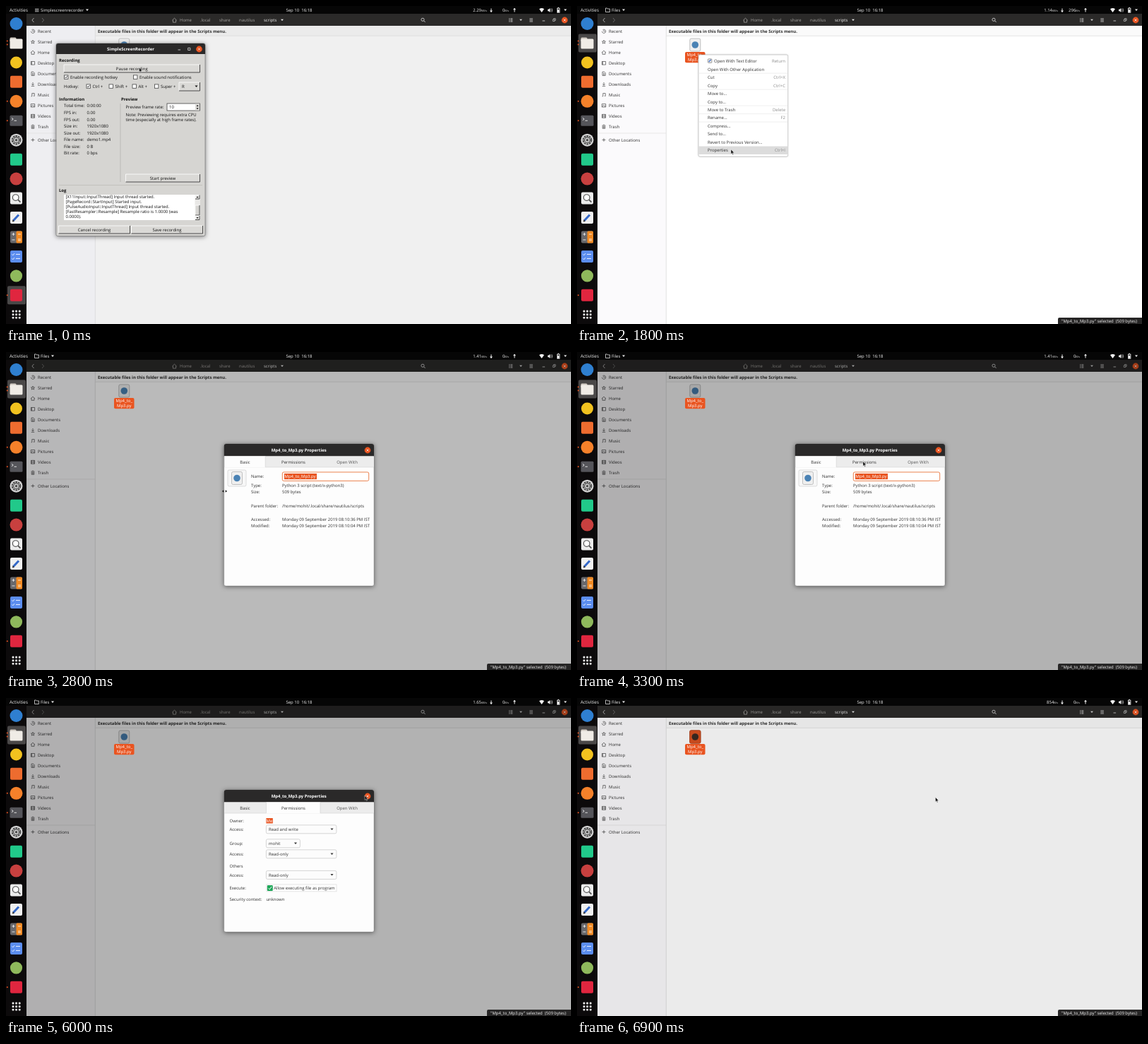
These frames come from a looping animation (800 px wide and 450 px high, 7000 ms). An HTML page:

```html
<!DOCTYPE html>
<html lang="en">
<head>
<meta charset="utf-8">
<title>Script permissions</title>
<style>
html, body { margin: 0; width: 100%; height: 100%; overflow: hidden; background: #000; }
svg { display: block; width: 800px; height: 450px; }
text { font: 500 5.98px "Open Sans", "Noto Sans", sans-serif; text-rendering: geometricPrecision; }
.b { font-weight: 700; }
.shadow { filter: drop-shadow(0 1px 3px rgba(0,0,0,.5)); }
.soft { filter: drop-shadow(0 .5px 1px rgba(0,0,0,.18)); }
</style>
</head>
<body>
<svg id="stage" viewBox="0 0 800 450"></svg>
<script>
const LOOP = 7000, STEP = 100;
const ORANGE = '#e95420', INK = '#303030', DARK = '#2a2929';

// Markup helpers
const rect = (x, y, w, h, fill, more = '') =>
  `<rect x="${x}" y="${y}" width="${w}" height="${h}" fill="${fill}" ${more}/>`;
const disc = (x, y, r, fill, more = '') => `<circle cx="${x}" cy="${y}" r="${r}" fill="${fill}" ${more}/>`;
const line = (d, color = '#444', w = .7) => `<path d="${d}" fill="none" stroke="${color}" stroke-width="${w}"/>`;
const fill = (d, color) => `<path d="${d}" fill="${color}"/>`;
const text = (x, y, s, color = INK, more = '') => `<text x="${x}" y="${y}" fill="${color}" ${more}>${s}</text>`;
const mid = (x, y, s, color, more = '') => text(x, y, s, color, 'text-anchor="middle" ' + more);
const bold = (x, y, s, color) => text(x, y, s, color, 'class="b"');
const tri = (x, y, color) => fill(`M${x - 2} ${y - 1}h4l-2 2.4z`, color);
const group = (id, body, more = '') => `<g id="${id}" ${more}>${body}</g>`;
const closeButton = (x, y) =>
  disc(x, y, 4.4, ORANGE) + line(`M${x - 1.5} ${y - 1.5}l3 3m0 -3l-3 3`, '#fff', .7);

function topBar() {
  const arrow = (x, up) => line(up ? `M${x} 8.5v-5` : `M${x} 3.5v5`, '#eee', 1) +
    fill(up ? `M${x - 2} 5.2h4l-2 -2.4z` : `M${x - 2} 6.6h4l-2 2.4z`, '#eee');
  const w = '#f2f2f2';
  return rect(0, 0, 800, 11, '#060606') +
    text(5, 8, 'Activities', w, 'style="font-size:6.3px"') +
    group('appA', line('M41 4.2h5.5M41 6h5.5M41 7.8h5.5', '#ddd', .8) + text(49, 8, 'Simplescreenrecorder', w) + tri(115, 5.6, w)) +
    group('appB', line('M40.5 8.5v-5.5h2l.8 1h3.2v4.5z', '#ddd', .8) + text(49, 8, 'Files', w) + tri(66, 5.6, w)) +
    mid(415, 8, 'Sep 10\u00a0 16:18', w) +
    group('down', '') + arrow(687) + group('up', '') + arrow(720, true) +
    fill('M755 4.3q3.5 -2.6 7 0l-3.5 4.7z', w) +
    fill('M767 4.8h1.4l2 -1.8v6l-2 -1.8h-1.4z', w) + line('M771.5 4.3q1.4 1.7 0 3.4M772.7 3.2q2.3 2.8 0 5.6', w, .6) +
    rect(780.5, 3.2, 3.4, 6, 'none', `stroke="${w}" stroke-width=".8"`) + rect(781, 5, 2.4, 4, w) + rect(781.4, 2, 1.6, 1, w) +
    tri(792, 5.6, w);
}

function dock() {
  const x = 14.5, y = i => 25 + 27.45 * i;
  const tile = (i, c) => rect(6, y(i) - 8.5, 17, 17, c, 'rx="2"');
  const dot = v => disc(1.8, v, 1, ORANGE);
  let s = rect(0, 11, 29, 439, '#0c0a0b') +
    rect(2, y(1) - 13, 26, 26, '#4a4848', 'rx="2" id="litFiles"') +
    rect(2, y(14) - 13, 26, 26, '#4a4848', 'rx="2" id="litRec"') +
    disc(x, y(0), 9, '#2f7fd0') +
    rect(5.5, y(1) - 8, 9, 6, '#cfc8c0', 'rx="1.5"') + rect(5.5, y(1) - 6, 18, 14, '#f0ece6', 'rx="1.5"') +
    disc(x, y(2), 8.5, '#f2c21f') + tile(3, '#ee6c2f') + disc(x, y(4), 9, '#f5812a') +
    rect(5.5, y(5) - 7.5, 18, 15, '#55555a', 'rx="1.5"') + line(`M8 ${y(5) - 4}l2.2 1.8l-2.2 1.8M11.5 ${y(5)}h3.5`, '#eee', .9) +
    disc(x, y(6), 9, '#d4d4d4') + disc(x, y(6), 5.8, 'none', 'stroke="#4a4a4a" stroke-width="2" stroke-dasharray="2.7 .94"') +
    disc(x, y(6), 3.8, 'none', 'stroke="#4a4a4a" stroke-width="1.2"') + disc(x, y(6), 1.8, '#4a4a4a') +
    tile(7, '#21c98a') + disc(x, y(8), 9, '#c8403f') +
    tile(9, '#ececec') + disc(13.7, y(9) - 1, 4.3, '#fff', 'stroke="#555" stroke-width="1.2"') + line(`M17 ${y(9) + 2}l3.4 3.6`, '#555', 1.8) +
    tile(10, '#f0f0f0') + line(`M10.5 ${y(10) + 4}l7.5 -8`, '#3468c8', 3) + fill(`M9 ${y(10) + 6}l.6 -3.2l2.4 2.2z`, '#222') +
    tile(11, '#68686c') + rect(14.5, y(11) - 8.5, 8.5, 17, '#f08a24', 'rx="1.5"') +
    line(`M8.5 ${y(11) - 4}h4M10.5 ${y(11) - 6}v4M8.5 ${y(11) + 4}h4M17 ${y(11) + 3}h4M17 ${y(11) + 5}h4M17 ${y(11) - 4}h4`, '#fff', .8) +
    tile(12, '#5b8def') + line(`M8.5 ${y(12) - 3}l1.3 1.3l2.2 -2.6M8.5 ${y(12) + 3}l1.3 1.3l2.2 -2.6M14 ${y(12) - 3}h6M14 ${y(12) + 3}h6`, '#fff', .9) +
    disc(x, y(13), 8.6, '#8fb95c') + tile(14, '#e0263f') +
    [49.5, 54.5, y(4), y(5), y(14)].map(dot).join('');
  for (let i = 0; i < 9; i++)
    s += rect(8.6 + i % 3 * 4.6, 430.6 + Math.floor(i / 3) * 4.6, 2.8, 2.8, '#eee', 'rx=".8"');
  return s;
}

const fileIcon = (x, y) => rect(x - 7.5, y - 9, 15, 18, '#efefef', 'rx="2" stroke="#a9a9a9" stroke-width=".7"') + disc(x, y, 4.8, '#4a82b4');

function header() {
  const g = '#a5a3a0', w = '#f4f4f4';
  return rect(29, 11, 771, 17, '#2b2a29') +
    line('M39.5 17l-2.6 3l2.6 3', '#c9c9c9', .8) + line('M51 17l2.6 3l-2.6 3', '#777', .8) +
    line('M235.4 20.2l3.1 -3l3.1 3M236.4 19.6v3.5h4.2v-3.5', g, .8) +
    [[246, 'Home'], [275, '.local'], [302, 'share'], [330, 'nautilus']].map(p => text(p[0], 22, p[1], g)).join('') +
    text(365, 22, 'scripts', w) + tri(391, 19.7, w) +
    disc(590, 19.3, 2.1, 'none', 'stroke="#ddd" stroke-width=".8"') + line('M591.6 20.9l2 2', '#ddd', .9) +
    line('M712 18h1.4M712 20h1.4M712 22h1.4M714.3 18h3M714.3 20h3M714.3 22h3', '#ddd', .9) + tri(729, 19.7, '#ddd') +
    line('M741.3 18h4.6M741.3 20h4.6M741.3 22h4.6', '#ddd', .8) +
    line('M759.5 21h3.6', '#ddd', .8) + line('M774.3 18.9h2.6v2.6h-2.6zM775.5 18.9v-1.2h2.6v2.6h-1.2', '#ddd', .6) + closeButton(791, 20);
}

function filesWindow() {
  const places = [
    ['Recent', 'M35.5 0a2.6 2.6 0 1 0 1 -2M38 -1.5v1.7h1.5'],
    ['Starred', 'M38 -2.4l.7 1.7h1.8l-1.4 1.2l.6 1.8l-1.7 -1.1l-1.7 1.1l.6 -1.8l-1.4 -1.2h1.8z'],
    ['Home', 'M35 .2l3 -2.8l3 2.8M36 -.4v2.9h4v-2.9'],
    ['Desktop', 'M35.4 -2.3h5.2v4.6h-5.2zM36.4 -2.3v4.6'],
    ['Documents', 'M36 -2.6h2.8l1.4 1.4v3.8h-4.2zM37 0h2.2M37 1.3h2.2'],
    ['Downloads', 'M38 -2.8v4M36.3 -.4l1.7 1.7l1.7 -1.7M35.8 2.6h4.4'],
    ['Music', 'M36.8 2v-4.2h3.4v3.8M35.6 2h1.2M39 1.6h1.2'],
    ['Pictures', 'M35.3 -2.2h5.4v4.4h-5.4zM35.8 1.6l1.6 -2l1.2 1.2l.8 -.6l1 1.4'],
    ['Videos', 'M35.4 -2.4h5.2v4.8h-5.2zM36.6 -2.4v4.8M39.4 -2.4v4.8M36.6 0h2.8'],
    ['Trash', 'M35.6 -1.8h4.8M37.2 -2.6h1.6M36.2 -1.2v3.7h3.6v-3.7M37.4 -.6v2.4M38.6 -.6v2.4'],
  ];
  const list = places.map(([name, d], i) =>
    `<g transform="translate(0 ${35.8 + 15 * i})">${line(d)}${text(45, 2.2, name)}</g>`).join('');
  return rect(29, 28, 97, 422, '#fafafa', 'id="side"') + rect(126, 28, 674, 422, '#fff', 'id="main"') +
    header() + line('M126.3 28v422', '#d6d6d6') + line('M29 180h97', '#dedede') + list +
    line('M35.6 189.5h4.8M38 187.1v4.8') + text(45, 191.7, 'Other Locations') +
    rect(126.6, 28, 674, 14, '#000', 'opacity=".02"') + line('M126.6 42.3h674', '#d2d2d2', .6) +
    bold(130, 37.6, 'Executable files in this folder will appear in the Scripts menu.', '#2e2e2e') +
    fileIcon(167.3, 55) +
    group('tint', rect(159.5, 45.7, 15.6, 18.6, '#d9501f', 'rx="2" stroke="#a83a12" stroke-width=".7"') + disc(167.3, 55, 4.8, '#3a2a22')) +
    rect(29, 11, 771, 439, '#000', 'id="dim"') +
    rect(153, 65, 28.5, 15.3, ORANGE, 'rx="2" id="pick"') +
    group('label', mid(167.3, 71.4, 'Mp4_to_') + mid(167.3, 78.4, 'Mp3.py')) +
    group('status', fill('M681 450v-7q0 -2 2 -2h117v9z', '#262525') +
      text(686, 447.9, '"Mp4_to_Mp3.py" selected\u00a0 (509 bytes)', '#f4f4f4'));
}

function recorder() {
  const k = '#111';
  const edge = (x, y, w, h) => line(`M${x} ${y + h}v${-h}h${w}`, '#fff', .8) + line(`M${x} ${y + h}h${w}v${-h}`, '#3c3c3a', .9);
  const button = (x, y, w, s) => rect(x, y, w, 11, '#dad9d6') + edge(x, y, w, 11) + mid(x + w / 2, y + 7.6, s, k);
  const check = (x, y, on, s) => rect(x, y - 2.8, 5.4, 5.4, '#fff', 'stroke="#444" stroke-width=".8"') +
    (on ? line(`M${x + 1.1} ${y}l1.2 1.3l2 -2.8`, k, .8) : '') + text(x + 8.5, y + 2.2, s, k);
  const info = [['Total time:', '0:00:00'], ['FPS in:', '0.00'], ['FPS out:', '0.00'], ['Size in:', '1920x1080'],
    ['Size out:', '1920x1080'], ['File name:', 'demo1.mp4'], ['File size:', '0 B'], ['Bit rate:', '0 bps']];
  const log = ['[X11Input::InputThread] Input thread started.', '[PageRecord::StartInput] Started input.',
    '[PulseAudioInput::InputThread] Input thread started.', '[FastResampler::Resample] Resample ratio is 1.0000 (was', '0.0000).'];
  return rect(71, 53, 211, 272.5, '#d6d5d2', 'rx="2" stroke="#555" stroke-width=".5"') +
    fill('M71 68v-12q0 -3 3 -3h205q3 0 3 3v12z', DARK) + mid(176.5, 63, 'SimpleScreenRecorder', '#fff', 'class="b"') +
    line('M243.5 62h3.6', '#ddd', .8) + line('M257.7 59.3h3.2v3.2h-3.2z', '#ddd', .8) + closeButton(273.5, 61) +
    bold(75, 78.6, 'Recording', k) + button(82, 83, 192.5, 'Pause recording') +
    check(82.5, 100.7, true, 'Enable recording hotkey') + check(180.5, 100.7, false, 'Enable sound notifications') +
    text(82, 116, 'Hotkey:', k) + check(114, 113.7, true, 'Ctrl +') + check(146, 113.7, false, 'Shift +') +
    check(179, 113.7, false, 'Alt +') + check(210.5, 113.7, false, 'Super +') +
    rect(245, 108, 29.5, 12, '#dad9d6') + edge(245, 108, 29.5, 12) + text(249, 116.2, 'R', k) + tri(269.5, 113.5, k) +
    bold(75, 133.8, 'Information', k) + bold(163, 133.8, 'Preview', k) +
    info.map(([a, b], i) => text(82, 143.4 + 9.55 * i, a, k) + text(114.5, 143.4 + 9.55 * i, b, k)).join('') +
    line('M162 138v111', '#a9a8a5', .6) + text(169.5, 145, 'Preview frame rate:', k) +
    rect(228, 138, 46.5, 10, '#fff', 'stroke="#444" stroke-width=".8"') + rect(268, 138.5, 6, 9, '#dad9d6') +
    text(231, 145.2, '10', k) + fill('M269.6 142h3l-1.5 -2zM269.6 144.3h3l-1.5 2z', k) +
    text(169.5, 156.2, 'Note: Previewing requires extra CPU', k) + text(169.5, 163, 'time (especially at high frame rates).', k) +
    button(169.5, 238, 105, 'Start preview') + line('M75 253.5h203', '#b5b4b1', .6) + bold(75, 263, 'Log', k) +
    '<clipPath id="logBox"><rect x="82" y="267" width="193" height="36"/></clipPath>' +
    rect(82, 267, 192.5, 36, '#fff') +
    `<g clip-path="url(#logBox)">${log.map((s, i) => text(84.5, 271.5 + 7.05 * i, s, k)).join('')}</g>` +
    rect(267.5, 267, 7, 36, '#e9e8e6') + rect(268, 282, 6, 14, '#d6d5d2') + edge(268, 282, 6, 14) +
    edge(268, 267.5, 6, 5.5) + edge(268, 297, 6, 5.5) + fill('M269.5 271.3h3l-1.5 -2zM269.5 299h3l-1.5 2z', k) +
    button(74.5, 311, 101, 'Cancel recording') + button(177.5, 311, 101, 'Save recording');
}

const ROW = 11.48, MENU_TOP = 72.2;
function menu() {
  const items = [['Open With Text Editor', 'Return'], ['Open With Other Application'], ['Cut', 'Ctrl+X'], ['Copy', 'Ctrl+C'],
    ['Move to…'], ['Copy to…'], ['Move to Trash', 'Delete'], ['Rename…', 'F2'], ['Compress…'], ['Send to…'],
    ['Revert to Previous Version…'], ['Properties', 'Ctrl+I']];
  return rect(172, 69, 126.7, 144, '#fff', 'rx="2" stroke="#b0b0b0" stroke-width=".6"') +
    rect(172.3, 0, 126.1, ROW, '#dcdcdc', 'id="hover"') +
    [2, 4, 6, 7, 8].map(i => line(`M172.5 ${MENU_TOP + ROW * i}h125.8`, '#e4e4e4', .6)).join('') +
    rect(185.3, 74.8, 5.6, 5.6, '#e8e8e8', 'rx="1" stroke="#666" stroke-width=".6"') + line('M186.6 79l3 -3.2', '#3468c8', 1.2) +
    items.map(([s, key], i) => {
      const y = 80.1 + ROW * i;
      return text(i ? 185 : 194, y, s) + (key ? text(295, y, key, '#8a8a8a', 'text-anchor="end"') : '');
    }).join('');
}

function dialog() {
  const rows = [[191, 'Type:', 'Python 3 script (text/x-python3)'], [200.4, 'Size:', '509 bytes'],
    [219.5, 'Parent folder:', '/home/mohit/.local/share/nautilus/scripts'],
    [238.8, 'Accessed:', 'Monday 09 September 2019 08:10:36 PM IST'],
    [248.4, 'Modified:', 'Monday 09 September 2019 08:10:04 PM IST']];
  const basic = rect(314, 167, 26, 23, '#f7f7f7', 'rx="2" stroke="#cfcfcf" stroke-width=".7"') + fileIcon(327, 178.5) +
    text(347, 178.2, 'Name:') + rect(391.3, 170, 122.4, 12.4, '#fff', 'rx="2" stroke-width=".9" id="entry"') +
    rect(394, 172, 46, 8.2, ORANGE) + text(394.5, 178.2, 'Mp4_to_Mp3.py', '#fff') +
    rows.map(([y, a, b]) => text(347, y, a) + text(391, y, b)).join('');
  const combo = (y, w, s) => rect(368.4, y - 6, w, 12, '#fcfcfc', 'rx="2" stroke="#c4c4c4" stroke-width=".7"') +
    text(372, y + 2.2, s) + tri(362 + w, y - .3, INK);
  const labels = [[175.8, 'Owner:'], [188, 'Access:'], [208, 'Group:'], [223, 'Access:'], [240.4, 'Others'],
    [252.6, 'Access:'], [271.2, 'Execute:'], [287, 'Security context:']];
  const perms = labels.map(([y, s]) => text(316.5, y, s)).join('') +
    rect(368.4, 170, 9.4, 7.4, ORANGE) + text(368.6, 175.8, 'Me', '#fff') +
    combo(185.8, 99.5, 'Read and write') + combo(205.8, 48, 'mohit') + combo(220.8, 99.5, 'Read-only') + combo(250.4, 99.5, 'Read-only') +
    rect(369, 263.9, 99, 10, 'none', 'stroke="#d5d5d5" stroke-width=".6" id="focus"') +
    rect(370.2, 265.4, 7.2, 7.2, '#fff', 'rx="1" stroke="#bbb" stroke-width=".7"') +
    group('tick', rect(369.9, 265.1, 7.8, 7.8, '#1fa85a', 'rx="1"') + line('M371.6 269.2l1.6 1.7l2.9 -4', '#fff', 1)) +
    text(379.3, 271.2, 'Allow executing file as program') + text(368.4, 287, 'unknown');
  const tab = (id, x, w) => group(id, rect(x, 147.5, w, 16, '#fdfdfd') + line(`M${x} 147.5v15.5M${x + w} 147.5v15.5`, '#d2d2d2', .6));
  return rect(308.7, 130, 212.3, 201, '#fdfdfd', 'rx="2.5" stroke="#777" stroke-width=".4"') +
    fill('M308.7 147.5v-14.5q0 -3 3 -3h206.3q3 0 3 3v14.5z', DARK) + mid(414.7, 141.2, 'Mp4_to_Mp3.py Properties', '#fff', 'class="b"') +
    closeButton(512, 139) + rect(309, 147.5, 211.8, 15.5, '#ececec') + line('M309 163h212', '#d2d2d2', .6) +
    tab('tabA', 309.4, 57.8) + tab('tabB', 368.5, 76.5) +
    mid(338.5, 157.6, 'Basic') + mid(407, 157.6, 'Permissions') + mid(483, 157.6, 'Open With', '#555') +
    group('basic', basic) + group('perms', perms);
}

const pointer = group('arrow', '<path d="M0 0v6.4l1.5 -1.3l1 2.3l1 -.4l-1 -2.3h2z" fill="#111" stroke="#fff" stroke-width=".4"/>') +
  group('resize', fill('M-3.6 0l2.4 -1.7v3.4zM3.6 0l-2.4 -1.7v3.4z', '#111'));

const stage = document.getElementById('stage');
stage.innerHTML = filesWindow() + topBar() + dock() + group('rec', recorder(), 'class="shadow"') +
  group('menu', menu(), 'class="soft"') + group('props', dialog(), 'class="shadow"') + group('pointer', pointer);

const el = id => document.getElementById(id);
const set = (id, name, value) => el(id).setAttribute(name, value);
const show = (id, on) => el(id).style.display = on ? '' : 'none';

// time, x, y
const path = [
  [0, 188.5, 87], [100, 188.5, 87], [400, 245, 61], [600, 245, 61], [900, 166, 62], [1100, 166, 62],
  [1300, 171, 68], [1400, 171, 68], [1800, 218, 203], [2100, 219.5, 207.5], [2500, 219.5, 207.5],
  [2800, 309.5, 197], [3200, 405, 155], [3500, 405, 155], [4300, 388.5, 251.5], [4700, 372, 268],
  [5600, 372, 268], [6000, 508, 138], [6300, 508, 139], [6900, 507.5, 140.5],
];
const speeds = [[0, '2.29', 'KB/s', '0'], [900, '1.14', 'KB/s', '296'], [2200, '1.41', 'KB/s', '0'],
  [3500, '1.96', 'KB/s', '367'], [4900, '1.65', 'KB/s', '0'], [6500, '854', 'B/s', '0']];

const clamp = v => Math.min(1, Math.max(0, v));
const ramp = (t, a, b) => clamp((t - a) / (b - a));
const rate = (x, n, unit) => text(x, 8, `${n}<tspan style="font-size:3.8px">${unit}</tspan>`, '#f2f2f2', 'text-anchor="end"');

function pointerAt(t) {
  const i = path.findIndex(p => p[0] > t);
  if (i < 0) return path[path.length - 1].slice(1);
  const [t0, x0, y0] = path[i - 1], [t1, x1, y1] = path[i];
  const u = ramp(t, t0, t1), k = u * u * (3 - 2 * u);
  return [x0 + (x1 - x0) * k, y0 + (y1 - y0) * k];
}

function draw(t) {
  const [x, y] = pointerAt(t);
  const focused = t >= 600, picked = t >= 1100, perms = t >= 3400, ticked = t >= 5300;

  show('appA', !focused);
  show('appB', focused);
  show('litRec', !focused);
  show('litFiles', focused);
  set('side', 'fill', focused ? '#fbfafc' : '#eeeef1');
  set('main', 'fill', focused ? '#fff' : '#f0f0f0');

  const [, down, unit, up] = speeds.filter(s => s[0] <= t).pop();
  el('down').innerHTML = rate(681, down, unit);
  el('up').innerHTML = rate(712, up, 'B/s');

  // Minimise towards the dock
  const m = ramp(t, 500, 800);
  show('rec', m < 1);
  set('rec', 'transform', `translate(${14 * m} ${410 * m}) scale(${1 - m})`);
  set('rec', 'opacity', 1 - m * .6);

  show('pick', picked);
  show('status', picked);
  show('tint', t >= 6500);
  for (const line of el('label').children) line.setAttribute('fill', picked ? '#fff' : INK);

  show('menu', t >= 1400 && t < 2200);
  const row = Math.floor((y - MENU_TOP) / ROW);
  show('hover', x > 172 && row >= 0);
  set('hover', 'y', MENU_TOP + ROW * Math.min(row, 11));

  const open = t < 6500 ? ramp(t, 2200, 2400) : 1 - ramp(t, 6400, 6600);
  const scale = .85 + .15 * open;
  show('props', open > 0);
  set('props', 'opacity', open);
  set('props', 'transform', `translate(415 230.5) scale(${scale}) translate(-415 -230.5)`);
  set('dim', 'opacity', t < 6500 ? .3 * ramp(t, 2350, 2850) : .3 - .22 * ramp(t, 6500, 6900));
  set('entry', 'stroke', t < 2600 ? '#d8c4a0' : '#e9743c');
  show('tabA', !perms);
  show('tabB', perms);
  show('basic', !perms);
  show('perms', perms);
  show('tick', ticked);
  show('focus', ticked);

  const onEdge = open === 1 && Math.abs(x - 309) < 3 && y > 150;
  show('arrow', !onEdge);
  show('resize', onEdge);
  set('pointer', 'transform', `translate(${x} ${y})`);
}

let last = -1;
function tick() {
  const t = Math.floor(performance.now() % LOOP / STEP) * STEP;
  if (t !== last) draw(last = t);
  requestAnimationFrame(tick);
}
tick();
</script>
</body>
</html>
```
